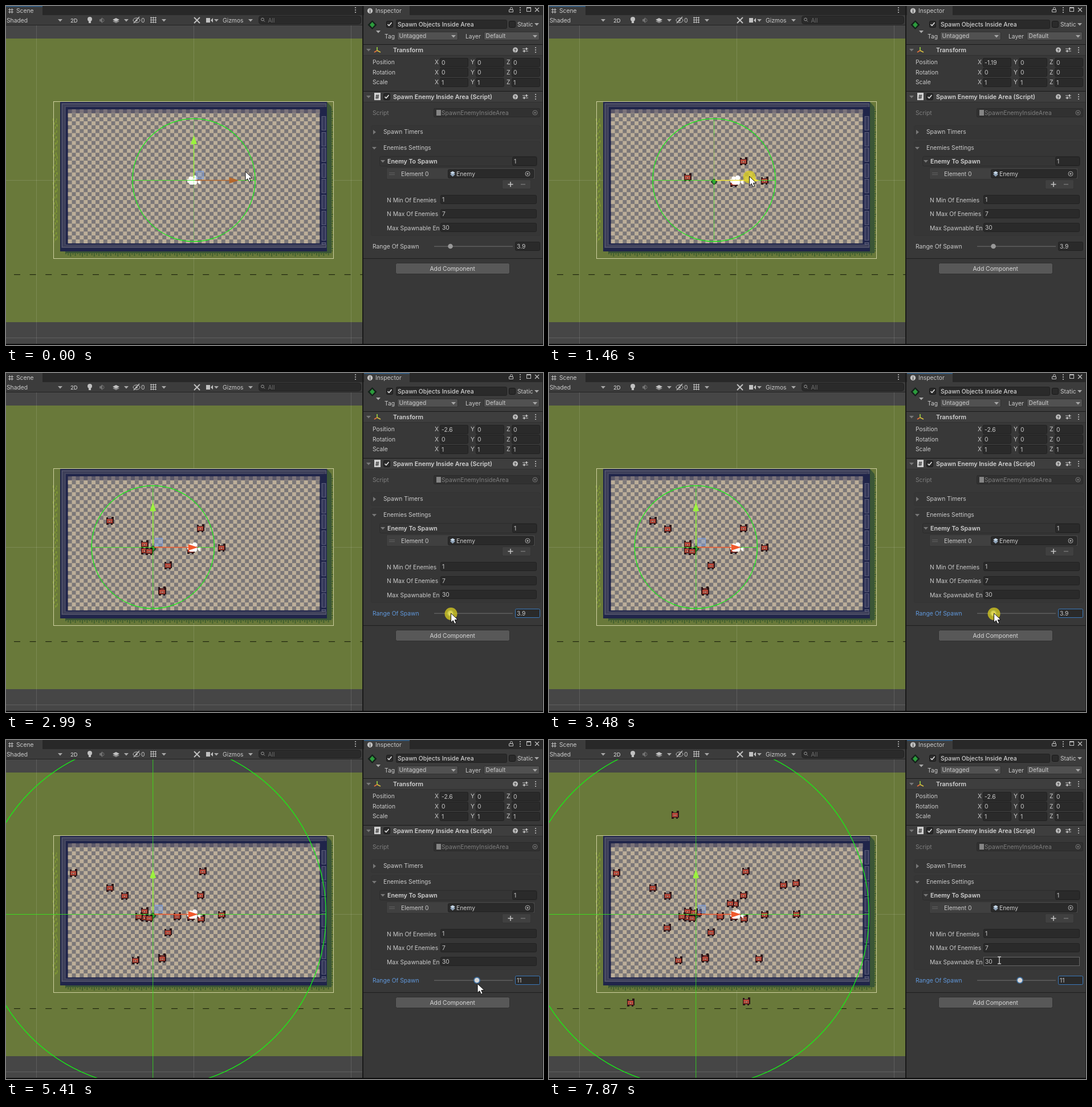
Write an HTML page with a canvas that moves like this. It is 942 px wide and 594 px high and loops after 7940 ms.

```html
<!DOCTYPE html>
<html lang="en">
<head>
<meta charset="utf-8">
<title>Spawn area editor</title>
<style>
html, body { margin: 0; width: 100%; height: 100%; overflow: hidden; background: #191919; }
canvas { display: block; }
</style>
</head>
<body>
<canvas id="stage" width="942" height="594"></canvas>
<script>
const LOOP = 7940, UNIT = 27.6, OX = 329.5, OY = 305.5;
const FONT = 'Inter, "Liberation Sans", sans-serif';
const TEXT = '#cacaca', ICON = '#c0c0c0', NAVY = '#20254a';
const stage = document.getElementById('stage').getContext('2d');
const backdrop = document.createElement('canvas');
backdrop.width = 942;
backdrop.height = 594;
let g = backdrop.getContext('2d');

function rect(x, y, w, h, color) {
  g.fillStyle = color;
  g.fillRect(x, y, w, h);
}
function frame(x, y, w, h, color) {
  g.strokeStyle = color;
  g.lineWidth = 1;
  g.strokeRect(x + .5, y + .5, w - 1, h - 1);
}
function poly(points, color, outline) {
  g.beginPath();
  for (let i = 0; i < points.length; i += 2) g.lineTo(points[i], points[i + 1]);
  g.closePath();
  g.fillStyle = color;
  g.fill();
  if (outline) { g.strokeStyle = outline; g.lineWidth = 1; g.stroke(); }
}
function line(x1, y1, x2, y2, color, width = 1) {
  g.beginPath();
  g.moveTo(x1, y1);
  g.lineTo(x2, y2);
  g.strokeStyle = color;
  g.lineWidth = width;
  g.stroke();
}
function disc(x, y, r, color) {
  g.beginPath();
  g.arc(x, y, r, 0, 7);
  g.fillStyle = color;
  g.fill();
}
function ring(x, y, r, color, width = 1) {
  g.beginPath();
  g.arc(x, y, r, 0, 7);
  g.strokeStyle = color;
  g.lineWidth = width;
  g.stroke();
}
function box(x, y, w, h, fill, border, r = 2) {
  g.beginPath();
  g.roundRect(x + .5, y + .5, w - 1, h - 1, r);
  g.fillStyle = fill;
  g.fill();
  g.strokeStyle = border;
  g.lineWidth = 1;
  g.stroke();
}
// y is the middle of the capitals
function text(s, x, y, color = TEXT, weight = 400, size = 10.3) {
  g.font = `${weight} ${size}px ${FONT}`;
  g.fillStyle = color;
  g.fillText(s, x, y + 3.8);
}
function bold(s, x, y) { text(s, x, y, '#d2d2d2', 600, 10.6); }
function field(x, y, w, s, border = '#212121') {
  box(x, y, w, 16, '#2a2a2a', border);
  text(s, x + 3, y + 8.3);
}
function diamond(x, y, rx, ry, color) { poly([x, y - ry, x + rx, y, x, y + ry, x - rx, y], color); }
function down(x, y, color = '#a8a8a8') { poly([x - 4, y - 2, x + 4, y - 2, x, y + 2.5], color); }
function right(x, y) { poly([x - 2, y - 4, x + 3, y, x - 2, y + 4], '#787878'); }
function dots(x, y) { for (const d of [-4, 0, 4]) disc(x, y + d, 1.1, ICON); }
function target(x, y, color) { ring(x, y, 4, color); disc(x, y, 1.6, color); }
function check(x, y, on) {
  box(x, y, 12, 12, '#2a2a2a', '#181818');
  if (!on) return;
  line(x + 2.5, y + 6, x + 5, y + 8.7, '#e0e0e0', 1.6);
  line(x + 4.6, y + 8.8, x + 9.5, y + 3, '#e0e0e0', 1.6);
}
function dropdown(x, w, s) {
  box(x, 45, w, 15, '#515151', '#303030');
  text(s, x + 3.5, 52.5);
  down(x + w - 8, 53);
}

function drawSceneTools() {
  rect(0, 0, 625, 16, '#282828');
  rect(0, 0, 64, 34, '#3c3c3c');
  rect(0, 16, 625, 18, '#3c3c3c');
  rect(0, 33, 625, 1, '#232323');
  for (const d of [-2, 2]) {
    line(8.5 + d, 4, 8.5 + d, 13, ICON);
    line(4, 8.5 + d, 13, 8.5 + d, ICON);
  }
  text('Scene', 18, 8.5);
  dots(613, 7);
  text('Shaded', 1, 25);
  text('2D', 113, 25, TEXT, 500, 9.5);
  disc(147, 23, 4, ICON);
  rect(145, 26, 4, 4, ICON);
  poly([164, 23, 166, 23, 169, 20, 169, 30, 166, 27, 164, 27], '#707070');
  ring(169, 25, 3, '#707070');
  diamond(193, 27, 6, 3, '#8a8a8a');
  diamond(193, 24, 6, 3, ICON);
  g.beginPath();
  g.ellipse(229, 25, 6, 4, 0, 0, 7);
  g.strokeStyle = ICON;
  g.stroke();
  disc(229, 25, 1.7, ICON);
  line(224, 30, 234, 19, ICON, 1.4);
  text('0', 237, 25);
  for (const d of [-4, 0, 4]) {
    line(258.5 + d, 19, 258.5 + d, 30, ICON);
    line(253, 24.5 + d, 264, 24.5 + d, ICON);
  }
  line(330, 20, 340, 30, ICON, 2);
  line(330, 30, 340, 20, ICON, 2);
  rect(351, 21, 7, 8, ICON);
  poly([359, 25, 363, 21, 363, 29], ICON);
  text('Gizmos', 380, 25);
  for (const x of [95, 211, 277, 369, 429]) down(x, 25);
  box(443, 17, 180, 15, '#2a2a2a', '#222', 4);
  ring(450, 23.5, 2.4, '#999');
  line(452, 25.5, 454, 27.5, '#999');
  text('All', 459.5, 25, '#6c6c6c');
}

function drawGround() {
  rect(0, 34, 625, 558, '#464646');
  rect(0, 57, 625, 497, '#69793a');
  for (const d of [-10, 0, 10]) {
    rect(Math.floor(OX + d * UNIT), 34, 1, 558, 'rgba(255,255,255,.13)');
    rect(0, Math.floor(OY + d * UNIT), 625, 1, 'rgba(255,255,255,.13)');
  }
  for (let x = 14; x < 625; x += UNIT) rect(x, 470, Math.min(11, 625 - x), 1.2, '#20260f');
  for (let i = 0; i < 62; i++) {
    const y = 197 + i * 3.5;
    rect(82 + i * 5 % 8, y, 1.4, 4, '#86a032');
    if (i % 3 === 0) rect(88, y, 1.5, 3, '#7b9535');
  }
}

function drawRoom() {
  const shade = '#3b5636', grass = '#43602f';
  rect(104, 175, 459, 258, shade);
  poly([563, 168, 571, 177, 571, 433, 563, 433], shade);
  for (let i = 0; i < 112; i++) rect(104 + i * 4.15, 433, 2, 2 + i * 7 % 5, grass);
  for (let i = 0; i < 63; i++) rect(571, 180 + i * 4, 1 + i * 5 % 3, 2, grass);
  frame(83, 167, 492, 276, '#cfd0a0');

  rect(95, 168, 468, 262, NAVY);
  rect(97, 170, 465, 254, '#3d3f59');
  frame(98, 171, 464, 252, '#5a5c73');
  frame(103, 176, 454, 243, '#4a4c66');
  rect(105, 177, 458, 241, NAVY);
  for (let bottom = 218; bottom < 440; bottom += UNIT) {
    const top = Math.max(Math.round(bottom - 25), 178), end = Math.min(Math.round(bottom), 418);
    rect(553, top, 9, end - top, '#34385a');
    frame(554, top, 7, end - top, '#5a5c78');
  }

  const cell = UNIT / 4, x0 = OX - 32 * cell, y0 = OY - 18 * cell;
  rect(x0, y0, 64 * cell, 34 * cell, '#7b7778');
  for (let r = 0; r < 34; r++)
    for (let c = 1 - r % 2; c < 64; c += 2)
      rect(x0 + c * cell, y0 + r * cell, cell, cell, '#bcae99');
  rect(x0, y0, 64 * cell, 6.5, 'rgba(60,58,90,.5)');
}

function header(y, name) {
  rect(627, y - 10, 315, 1, '#1a1a1a');
  rect(627, y - 9, 315, 18, '#3e3e3e');
  rect(627, y + 9, 315, 1, '#303030');
  down(636, y, '#787878');
  bold(name, 679, y);
  disc(893.5, y, 4.5, ICON);
  text('?', 891, y, '#3e3e3e', 700, 8);
  for (const d of [-2, 2]) {
    line(906, y + d, 916, y + d, ICON);
    rect(910 - d, y + d - 2, 2, 4, ICON);
  }
  dots(929, y);
}

function drawTabs() {
  rect(625, 0, 2, 594, '#191919');
  rect(627, 0, 315, 594, '#383838');
  rect(627, 0, 315, 16, '#282828');
  rect(628, 0, 80, 16, '#3c3c3c');
  disc(638.5, 8.5, 4.7, ICON);
  text('i', 637.4, 8.5, '#3c3c3c', 700, 8);
  text('Inspector', 648, 8.5);
  ring(886.5, 4.5, 2, ICON);
  box(882, 6, 8, 5, '#282828', ICON, 0);
  dots(902, 7);
  frame(913, 2, 8, 8, ICON);
  rect(913, 2, 8, 2, ICON);
  line(928, 3, 935, 10, ICON, 1.3);
  line(935, 3, 928, 10, ICON, 1.3);
}

function drawObject() {
  rect(627, 16, 315, 51, '#3c3c3c');
  diamond(642.5, 33, 8, 8, '#14201a');
  diamond(642.5, 33, 4.5, 5, '#2c9c3c');
  down(653, 45);
  check(667, 26, true);
  box(684, 24, 195, 16, '#2a2a2a', '#212121');
  text('Spawn Objects Inside Area', 687, 32, '#d2d2d2', 500, 10.4);
  check(882, 26, false);
  text('Static', 897, 32);
  down(931, 32);
  text('Tag', 664, 53);
  dropdown(686, 107, 'Untagged');
  text('Layer', 806, 53);
  dropdown(838, 98, 'Default');

  header(77, 'Transform');
  line(651, 78, 651, 72, '#9edb3f', 1.6);
  line(651, 78, 646, 81, '#e8743c', 1.6);
  line(651, 78, 657, 81, '#d8c040', 1.6);
  ['Position', 'Rotation', 'Scale'].forEach((name, i) => {
    const y = 98.5 + i * 17.5;
    text(name, 643, y);
    ['X', 'Y', 'Z'].forEach((axis, j) => {
      text(axis, 752 + j * 63, y);
      field(761 + j * 63, Math.round(y - 8), 50, i === 2 ? '1' : '0');
    });
  });
}

function drawScript() {
  header(159, 'Spawn Enemy Inside Area (Script)');
  rect(646, 152, 11, 13, '#d0d0d0');
  text('#', 648, 159, '#3a3a3a', 700, 10);
  check(662, 153, true);
  text('Script', 643, 187, '#7e7e7e');
  box(750, 179, 187, 16, '#313131', '#2a2a2a');
  rect(755, 182, 8, 10, '#858585');
  text('SpawnEnemyInsideArea', 764, 187, '#7e7e7e');
  target(928, 187, '#777');

  box(640, 209, 298, 24, '#363636', '#343434', 3);
  right(646, 221);
  text('Spawn Timers', 662, 220.5);
  box(640, 237, 298, 166, '#363636', '#343434', 3);
  down(646, 249, '#787878');
  text('Enemies Settings', 662, 248.5);

  box(655, 263, 277, 18, '#353535', '#2c2c2c', 3);
  down(661, 272, '#787878');
  bold('Enemy To Spawn', 669, 272);
  field(888, 264, 43, '1');
  box(667, 283, 262, 21, '#404040', '#323232');
  for (const y of [292.5, 295.5]) line(672, y, 682, y, '#626262');
  text('Element 0', 693, 294);
  field(775, 286, 151, '');
  diamond(783.5, 295, 4.5, 4, '#8fa3b8');
  diamond(783.5, 292, 4.5, 2.5, '#c5d6e6');
  text('Enemy', 790, 294);
  target(915, 294, '#aaa');
  box(870, 304, 51, 17, '#404040', '#323232');
  line(880.5, 312.5, 889.5, 312.5, ICON, 1.6);
  line(885, 308, 885, 317, ICON, 1.6);
  line(903, 312.5, 911, 312.5, '#777', 1.4);
  ['N Min Of Enemies', 'N Max Of Enemies', 'Max Spawnable En'].forEach((name, i) => {
    const y = 340 + i * 24.5;
    text(name, 668, y);
    field(762, Math.floor(y - 8.5), 169, ['1', '7', '30'][i]);
  });

  rect(751, 420.5, 138, 1.5, '#5e5e5e');
  rect(627, 442, 315, 1, '#1d1d1d');
  box(683, 450, 201, 20, '#585858', '#303030', 3);
  text('Add Component', 743.5, 460, '#d8d8d8');
  rect(941, 0, 1, 594, '#202020');
  rect(0, 592, 942, 2, '#0c0c0c');
}

drawGround();
drawRoom();
drawSceneTools();
drawTabs();
drawObject();
drawScript();
g = stage;

// Linear interpolation through [time, value] pairs
function track(keys, t) {
  const i = keys.findIndex(key => t < key[0]);
  if (i === 0) return keys[0][1];
  if (i < 0) return keys[keys.length - 1][1];
  const [t0, a] = keys[i - 1], [t1, b] = keys[i];
  return a + (b - a) * (t - t0) / (t1 - t0);
}
function ease(t, from, to) {
  const k = Math.min(1, Math.max(0, (t - from) / (to - from)));
  return k * k * (3 - 2 * k);
}
const GRAB = 919, DROP = 1740, PRESS = 2880, RELEASE = 4800;
const position = t => track([[GRAB, 0], [1180, -.29], [DROP, -2.6]], t);
const range = t => track([[4180, 3.9], [4370, 8.3], [4750, 11]], t);
const knobAt = t => 754 + range(t) * 6.55;
const centre = t => OX + position(t) * UNIT;

function pointerAt(t) {
  const stops = [
    [420, 290, 0, 1],
    [centre(t) + 62, 303 - 6 * ease(t, GRAB, DROP), 300, 880],
    [knobAt(t) + 1, 421 + (range(t) - 3.9) * .85, 1950, 2850],
    [790, 386, 6500, 7500]
  ];
  return stops.reduce(([x, y], [sx, sy, from, to]) => {
    const k = ease(t, from, to);
    return [x + (sx - x) * k, y + (sy - y) * k];
  }, [420, 290]);
}

// Each enemy lands at random inside the circle of its moment
let seed = 11;
function random() {
  seed = (seed * 16807) % 2147483647;
  return seed / 2147483647;
}
const birth = i => track([[0, 840], [2, 1260], [8, 2300], [14, 4800], [17, 5480], [25, 6700], [28, 7870]], i);
const enemies = Array.from({ length: 29 }, (_, i) => {
  const born = birth(i), angle = random() * 2 * Math.PI;
  const reach = random() * Math.min(range(born), 8) * UNIT;
  return {
    born,
    x: Math.round(centre(born) + reach * Math.cos(angle)),
    y: Math.round(OY + reach * Math.sin(angle))
  };
});

function drawEnemy({ x, y }) {
  const dark = '#2a1517';
  rect(x - 6, y - 6, 3, 13, dark);
  rect(x + 3, y - 7, 4, 12, dark);
  rect(x - 6, y - 4, 12, 9, '#35171a');
  rect(x - 5, y - 3, 10, 7, '#a83c2e');
  rect(x - 4, y - 3, 8, 2, '#c65040');
  rect(x - 3, y, 6, 2, '#e0a590');
  for (const d of [-2, 1]) rect(x + d, y, 1, 2, dark);
  for (const d of [-5, 2]) rect(x + d, y + 4, 3, 3, dark);
}

function drawCamera() {
  disc(324, 302, 3.5, '#fff');
  disc(331, 301, 4.3, '#fff');
  box(321, 304, 14, 9, '#fff', '#fff');
  poly([335, 308, 341, 304, 341, 313], '#fff');
  poly([318, 303, 322, 303, 322, 311, 318, 309], '#f0f0f0');
}

function drawHandles(x, dragging, t) {
  const across = dragging ? '#f2e634' : t < GRAB ? '#b4672c' : '#f0592d';
  if (dragging) {
    line(x, 226, x, 300, 'rgba(225,140,140,.4)');
  } else {
    rect(x + 4, 289, 13, 14, 'rgba(130,165,230,.4)');
    frame(Math.round(x + 3), 289, 14, 14, 'rgba(110,160,255,.6)');
    line(x, 302, x, 242, '#8fee3c', 1.6);
    poly([x, 226, x + 5.5, 242, x - 5.5, 242], '#9cf23f');
  }
  line(x + 2, 305.5, x + 63, 305.5, across, 1.5);
  poly([x + 62, 300, x + 79, 305.5, x + 62, 311], across);
}

function drawPointer(x, y, beam) {
  if (beam) {
    line(x, y - 6, x, y + 6, '#e8e8e8', 1.2);
    for (const d of [-6, 6]) line(x - 3, y + d, x + 3, y + d, '#e8e8e8', 1.2);
    return;
  }
  const shape = [0, 0, 0, 16, 3.8, 12.6, 6.4, 18.4, 9.2, 17.2, 6.7, 11.6, 12, 11.4];
  poly(shape.map((v, i) => v + (i % 2 ? y : x)), '#fff', '#111');
}

function drawScene(t, dragging) {
  const x = centre(t), r = range(t) * UNIT;
  g.save();
  g.beginPath();
  g.rect(0, 34, 625, 558);
  g.clip();
  diamond(x, 308, 6, 6, '#1c3a1e');
  diamond(x, 308, 4, 4, '#2d9a3a');
  for (const e of enemies) if (t >= e.born) drawEnemy(e);
  drawCamera();
  line(x - r, 305.5, x + r, 305.5, 'rgba(50,235,25,.85)');
  line(x, 305 - r, x, 305 + r, `rgba(50,235,25,${.3 + .5 * ease(t, GRAB, DROP)})`);
  ring(x, 305, r, '#16f016', 1.3);
  drawHandles(x, dragging, t);
  g.restore();
}

function drawValues(t, typing) {
  const focused = t >= PRESS;
  rect(focused ? 628 : 0, 0, focused ? 80 : 64, 1.5, '#2f5f8a');
  // The number trails the handle slightly
  field(761, 91, 50, String(+position(t - 63).toFixed(2)));
  text('Range Of Spawn', 643, 421.5, focused ? '#6098dc' : TEXT);
  if (focused) disc(knobAt(t), 421, 6, 'rgba(62,125,190,.75)');
  disc(knobAt(t), 421, 4.3, focused ? '#d8d8d8' : '#999');
  field(893, 413, 44, String(+range(t).toFixed(1)), focused ? '#3a79bb' : '#212121');
  if (typing) frame(762, 380, 169, 16, '#656565');
}

function draw(t) {
  const [px, py] = pointerAt(t);
  const dragging = t >= GRAB && t < DROP + 160;
  const pressed = dragging || (t >= PRESS && t < RELEASE);
  const typing = t > RELEASE && py < 396;
  g.drawImage(backdrop, 0, 0);
  drawScene(t, dragging);
  drawValues(t, typing);
  if (pressed) disc(px, py + 1, 11, 'rgba(226,214,30,.72)');
  drawPointer(px, py, typing);
}

function tick(now) {
  draw(now % LOOP);
  requestAnimationFrame(tick);
}
draw(0);
requestAnimationFrame(tick);
</script>
</body>
</html>
```
